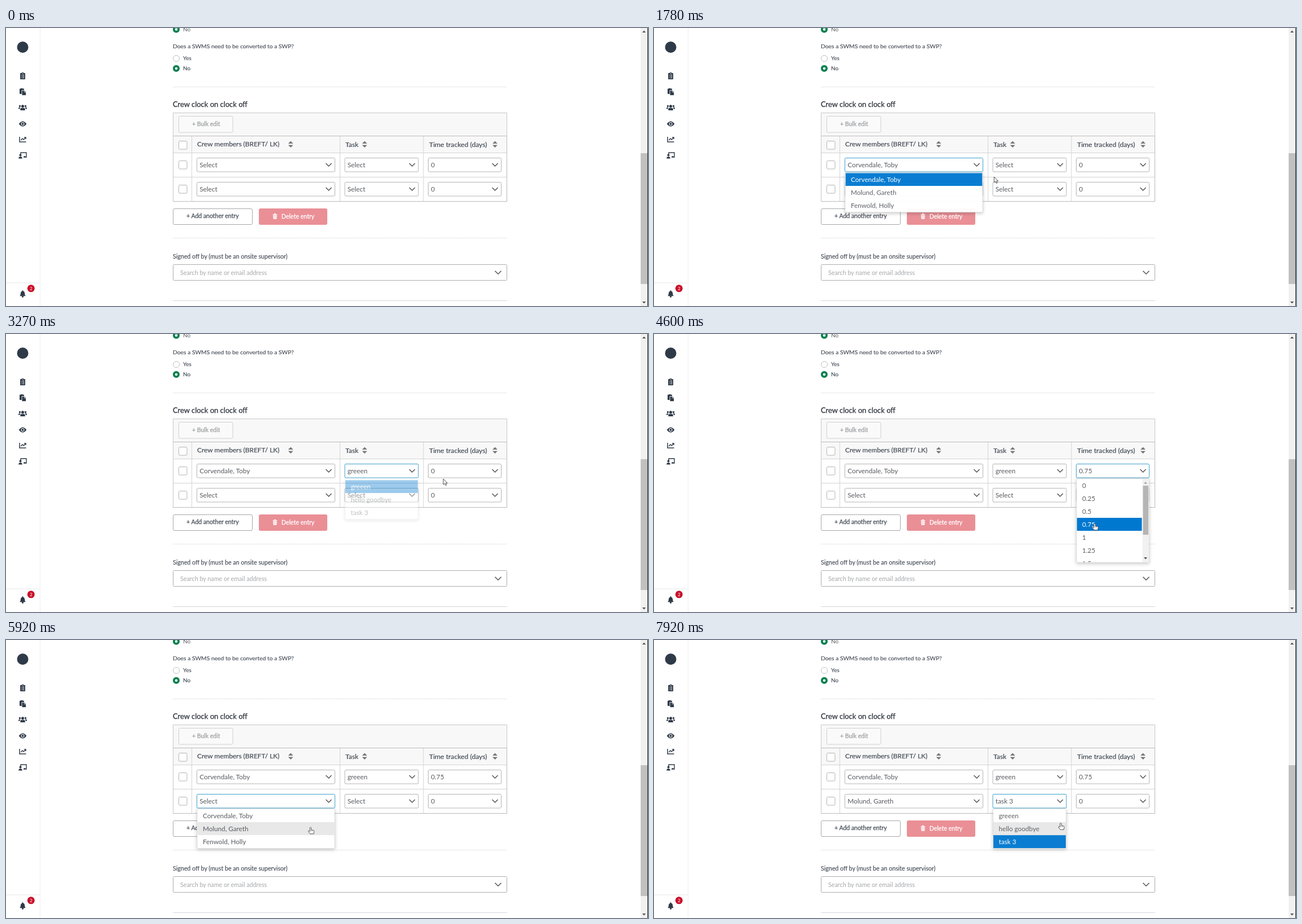
An HTML page for the animation above (7.99 s loop, 1135 by 493 pixels).

```html
<!DOCTYPE html>
<html lang="en">
<head>
<meta charset="utf-8">
<title>Crew clock on clock off</title>
<style>
  html, body { margin: 0; width: 100%; height: 100%; overflow: hidden; background: #fff; }
  svg { display: block; font-family: Lato, "Open Sans", sans-serif; }
  .menu { filter: drop-shadow(0 2px 3px rgba(0, 0, 0, .22)); }
</style>
</head>
<body>
<svg id="stage" width="1135" height="493" viewBox="0 0 1135 493">
  <g id="page"></g>
  <g id="fields"></g>
  <g id="menu"></g>
  <g id="pointer"></g>
</svg>
<script>
const LOOP = 7990;
const INK = '#434b55', TEXT = '#585b60', BLUE = '#0078d0', ICON = '#2f3a48';
const ROW = 23, OPEN_TIME = 280, CLOSE_DELAY = 150, CLOSE_TIME = 260;
const layer = id => document.getElementById(id);

// Shape helpers
const rect = (x, y, w, h, fill, stroke = 'none', r = 0, sw = 1) =>
  `<rect x="${x}" y="${y}" width="${w}" height="${h}" rx="${r}" fill="${fill}" stroke="${stroke}" stroke-width="${sw}"/>`;
const circle = (x, y, r, fill, stroke = 'none') =>
  `<circle cx="${x}" cy="${y}" r="${r}" fill="${fill}" stroke="${stroke}"/>`;
const path = (d, fill, stroke = 'none', sw = 1, extra = '') =>
  `<path d="${d}" fill="${fill}" stroke="${stroke}" stroke-width="${sw}" ${extra}/>`;
const at = (x, y, body) => `<g transform="translate(${x} ${y})">${body}</g>`;
const label = (str, x, cy, size, fill = TEXT, bold = 0) =>
  `<text x="${x}" y="${cy + size * 0.35}" font-size="${size}" fill="${fill}" stroke="${fill}" stroke-width="${bold}">${str}</text>`;
const chevron = (x, y, s = 1) =>
  path(`M${x - 5 * s} ${y - 2.5 * s}l${5 * s} ${5 * s} ${5 * s} ${-5 * s}`, 'none', '#555', 1.5);
const sorter = x => path(`M${x - 4.5} 205h9l-4.5 -4.5zM${x - 4.5} 207.5h9l-4.5 4.5z`, '#777');
const lerp = (a, b, k) => a + (b - a) * k;
const clamp = v => Math.max(0, Math.min(1, v));
const mix = (a, b, k) => `rgb(${a.map((v, i) => Math.round(lerp(v, b[i], k)))})`;

// Select boxes
const crew = ['Corvendale, Toby', 'Molund, Gareth', 'Fenwold, Holly'];
const tasks = ['greeen', 'hello goodbye', 'task 3'];
const days = ['0', '0.25', '0.5', '0.75', '1', '1.25', '1.5'];
const columns = [
  { x: 337.5, w: 244, options: crew, empty: 'Select' },
  { x: 599, w: 130, options: tasks, empty: 'Select' },
  { x: 746.5, w: 129, options: days, empty: '0', initial: 0, scrolls: true },
];
const fields = [230.5, 273.5].flatMap(y => columns.map(c => ({ ...c, y, h: 24.5 })));

// Each visit to a select: when it opens, when an option is picked, and which
const visits = [
  { field: 0, open: 970, pick: 1620, choice: 0 },
  { field: 1, open: 2250, pick: 2960, choice: 0 },
  { field: 2, open: 3450, pick: 4530, choice: 3 },
  { field: 3, open: 5290, pick: 6240, choice: 1 },
  { field: 4, open: 6700, pick: 7760, choice: 2 },
];

// Pointer tip: time, x, y
const route = [
  [430, 650, 292], [810, 545, 243], [1200, 545, 243], [1460, 540, 266], [1620, 540, 266],
  [1780, 601, 264], [2020, 652, 243], [2450, 652, 243], [2800, 655, 268], [2960, 655, 268],
  [3270, 773, 257], [3420, 787, 246], [3820, 787, 246], [4290, 779.5, 336], [4600, 779.5, 336],
  [5140, 545, 286], [5760, 545, 286], [5920, 538.5, 332], [6240, 538.5, 332],
  [6560, 645.5, 283], [7200, 645.5, 283], [7440, 700, 356], [7760, 700, 356],
  [7920, 719, 324.5], [7990, 722, 319],
];

function pointerAt(t) {
  if (t < route[0][0]) return null;
  const i = route.findIndex(p => p[0] > t);
  const [a, b] = [route[i - 1], route[i]];
  const k = (t - a[0]) / (b[0] - a[0]);
  return { x: lerp(a[1], b[1], k), y: lerp(a[2], b[2], k) };
}

const inside = (p, b) => p && p.x >= b.x && p.x <= b.x + b.w && p.y >= b.y && p.y <= b.y + b.h;

function chosen(index, t) {
  const visit = visits.find(v => v.field === index);
  return visit && t >= visit.pick ? visit.choice : fields[index].initial;
}

function menuAt(t) {
  const visit = visits.find(v => t >= v.open && t < v.pick + CLOSE_DELAY + CLOSE_TIME);
  if (!visit) return null;
  const f = fields[visit.field];
  const alpha = Math.min(clamp((t - visit.open) / OPEN_TIME),
    1 - clamp((t - visit.pick - CLOSE_DELAY) / CLOSE_TIME));
  return {
    ...f, alpha, index: visit.field, x: f.x + 1, w: f.w - 2, y: f.y + 26.5,
    h: f.scrolls ? 147.5 : f.options.length * ROW,
  };
}

function drawMenu(m, tip, t) {
  const selected = chosen(m.index, t);
  const rowWidth = m.scrolls ? 115 : m.w;
  const hover = inside(tip, m) ? Math.floor((tip.y - m.y) / ROW) : -1;
  const rows = m.options.map((name, i) => {
    const y = m.y + i * ROW;
    const fill = i === selected ? BLUE : i === hover ? '#e8e8e8' : '#fff';
    const h = Math.min(ROW, m.y + m.h - y);
    return rect(m.x, y, rowWidth, h, fill) +
      label(name, m.x + 9.5, y + 11.5, 11.7, i === selected ? '#fff' : TEXT);
  }).join('');
  const bar = m.scrolls
    ? rect(863.5, m.y, 11, m.h, '#f1f1f1') + rect(864.5, 269, 9.5, 87, '#b5b5b5') +
      path('M866 265.5h6l-3 -3.5z', '#a3a3a3') + path('M866 396h6l-3 3.5z', '#505050')
    : '';
  return `<g class="menu" opacity="${m.alpha}" transform="translate(0 ${3.5 * (1 - m.alpha)})">` +
    rect(m.x - .5, m.y - .5, m.w + 1, m.h + 1, '#fff', '#ddd') +
    `<clipPath id="list"><rect x="${m.x}" y="${m.y}" width="${m.w}" height="${m.h}"/></clipPath>` +
    `<g clip-path="url(#list)">${rows}${bar}</g></g>`;
}

function drawField(f, index, tip, covered, t) {
  const rest = [180, 180, 180], dark = [70, 78, 88], focus = [60, 160, 203];
  const start = visits.findIndex(v => v.field === index);
  const next = start >= 0 && visits[start + 1] ? visits[start + 1].open : LOOP;
  const focused = start >= 0 && t >= visits[start].open && t < next;
  const border = focused ? mix(dark, focus, clamp((t - visits[start].open) / 300))
    : mix(rest, dark, !covered && inside(tip, f) ? 1 : 0);
  const choice = chosen(index, t);
  return rect(f.x, f.y, f.w, f.h, '#fff', border, 2) +
    label(choice === undefined ? f.empty : f.options[choice], f.x + 4.7, f.y + 12.3, 11.8) +
    chevron(f.x + f.w - 11, f.y + 12);
}

const arrow = path('M0 0V10.2L2.4 8.1 4.1 11.6 5.8 10.8 4.2 7.5H7.2Z', '#fff', '#3a3a3a', .9);
const hand = path('M-1.2 .9Q0 -.8 1.2 .9V4.6L5.3 5.7Q6.4 6.1 6.2 7.4L5.5 11.8H-.8L-4 7.6Q-4.2 6 -2.6 6.4L-1.2 7.6Z',
  '#fff', '#444', .9, 'stroke-linejoin="round"') + path('M1.2 5v2M3.2 5.3v2', 'none', '#666', .7);

// Static page
function sidebar() {
  const fill = ICON, cut = '#fff';
  const clipboard = rect(-4.5, -5, 9, 11, fill, 'none', 1) + rect(-2, -6.2, 4, 2.5, fill, 'none', 1) +
    path('M-.8 -1.7h3.7M-.8 .8h3.7M-.8 3.3h3.7M-2.9 -1.7h1M-2.9 .8h1M-2.9 3.3h1M-1 -4.6h2', 'none', cut, .9);
  const copies = rect(-5.5, -5.5, 8, 9.5, fill, 'none', 1) + rect(-3, -6.3, 3, 2, fill, 'none', 1) +
    path('M-1.5 -2.5h4.5l3 3v6h-7.5z', fill, cut, .8) + path('M2.8 -2.3v3h3', 'none', cut, .7);
  const people = circle(-5, -2.5, 1.7, fill) + circle(5, -2.5, 1.7, fill) + circle(0, -2.2, 2.5, fill) +
    path('M-4.2 5v-2q0 -2.2 2.4 -2.2h3.6q2.4 0 2.4 2.2v2zM-7.5 2.5v-1.3q0 -1.5 1.5 -1.5h2.3q-1.3 1 -1.5 2.8zM7.5 2.5v-1.3q0 -1.5 -1.5 -1.5h-2.3q1.3 1 1.5 2.8z', fill);
  const eye = path('M-6.8 0Q0 -9 6.8 0Q0 9 -6.8 0Z', fill) + circle(0, 0, 3, cut) + circle(0, 0, 2, fill);
  const chart = path('M-5.5 -4.5v9h11.5', 'none', fill, 1.5) +
    path('M-3.3 1.5l2.8 -3 2.2 2 3.5 -3.8M2.5 -3.6h3v3', 'none', fill, 1.4);
  const teacher = path('M-3.5 -2v-3h10v8h-5', 'none', fill, 1.4) + circle(-4, -.5, 2, fill) +
    path('M-7.3 5.5q0 -3.5 3.3 -3.5t3.3 3.5z', fill) + rect(2, 1.2, 3, 1.8, fill);
  const bell = path('M-5.2 3.8Q-3.6 2.4 -3.6 -1Q-3.4 -4.5 0 -5.2Q3.4 -4.5 3.6 -1Q3.6 2.4 5.2 3.8Z', fill) +
    circle(0, 4.8, 1.6, fill) + rect(-.7, -6.3, 1.4, 2, fill);
  const icons = [[85, clipboard], [113, copies], [141, people], [170, eye], [197.5, chart], [226, teacher], [471.5, bell]];
  return rect(59.5, 0, 1, 493, '#f0f0f0') + rect(60.5, 0, 1.5, 493, '#fafafa') +
    rect(0, 451.5, 59, 1, '#e8e8e8') + circle(29.5, 34, 10, ICON) +
    icons.map(([y, body]) => at(29.5, y, body)).join('') +
    circle(44.2, 461.8, 6.5, '#c9102a') + label('2', 41.9, 461.8, 8, '#fff');
}

function radio(y, on) {
  return on ? circle(301, y, 6, '#007f4c') + circle(301, y, 2.3, '#fff') : circle(301, y, 5.5, '#fff', '#c0c0c0');
}

function table() {
  const line = '#d4d4d4';
  const rules = [191.5, 221.5, 264.5].map(y => `M295.5 ${y}H885.5`).join('') +
    [328.5, 590.5, 738].map(x => `M${x} 191.5V307.5`).join('');
  return rect(295.5, 150.5, 590, 157, '#fff') + rect(295.5, 150.5, 590, 71, '#f8f8f8') +
    path(rules, 'none', line) + rect(295.5, 150.5, 590, 157, 'none', '#c8c8c8') +
    path('M295.5 191.5H885.5V307.5H295.5', 'none', '#bbb') +
    rect(305.5, 156.5, 95.5, 28.5, '#fafafa', '#d0d0d0', 2) + label('+ Bulk edit', 329, 170.3, 10.5, '#96989b', .2) +
    [208, 243, 286].map(y => rect(305.5, y - 7.5, 14.5, 14.5, '#fff', '#b4b4b4', 2)).join('') +
    label('Crew members (BREFT/ LK)', 338, 206.3, 11.9, INK, .2) + sorter(503.3) +
    label('Task', 600, 206.3, 12, INK, .2) + sorter(634) +
    label('Time tracked (days)', 748, 206.3, 12.2, INK, .2) + sorter(864.5);
}

function buttons() {
  const bin = path('M-4 -3.2h8M-1.4 -4.5h2.8', 'none', '#fff', 1.3) + path('M-3.4 -1.8h6.8l-.5 6.6h-5.8z', '#fff') +
    path('M-1.3 -.6v4M1.3 -.6v4', 'none', '#ea8f96', .7);
  return rect(295.5, 320.5, 140, 28, '#fff', '#a6a7a9', 2.5) + label('+ Add another entry', 319, 333.8, 10.5, INK, .25) +
    rect(447, 320, 121, 29, '#ea8f96', 'none', 3) + at(475.5, 334, bin) +
    label('Delete entry', 487, 333.8, 10.6, '#fff', .3);
}

function page() {
  const dotted = y => path(`M295 ${y}H886`, 'none', '#dcdcdc', 1, 'stroke-dasharray="2 1"');
  return rect(0, 0, 1135, 493, '#fff') + sidebar() +
    radio(2.5, true) + label('No', 313, 2.8, 10) +
    label('Does a SWMS need to be converted to a SWP?', 295, 32.3, 10.3, INK, .15) +
    radio(54, false) + label('Yes', 313, 53.8, 10, INK, .15) + radio(71.8, true) + label('No', 313, 71.6, 10, INK, .15) +
    dotted(104.5) + label('Crew clock on clock off', 295, 135.3, 12.95, '#2a3038', .25) +
    table() + buttons() + dotted(372.5) +
    label('Signed off by (must be an onsite supervisor)', 295, 405.3, 10.65, INK, .15) +
    rect(295.5, 419.5, 590, 28, '#fff', '#adadad', 2) +
    label('Search by name or email address', 308, 434, 10.75, '#a5a7aa') + chevron(870, 433.5, 1.1) +
    rect(295, 483, 591, 1, '#d6d6d6') +
    rect(1122, 0, 12, 493, '#f1f1f1') + rect(1122, 222, 12, 232, '#c1c1c1') +
    path('M1125 8h6l-3 -3.5zM1125 485h6l-3 3.5z', '#505050') + rect(1134, 0, 1, 493, '#222');
}

function render(t) {
  const tip = pointerAt(t);
  const menu = menuAt(t);
  const covered = menu && inside(tip, menu);
  layer('fields').innerHTML = fields.map((f, i) => drawField(f, i, tip, covered, t)).join('');
  layer('menu').innerHTML = menu ? drawMenu(menu, tip, t) : '';
  const clickable = covered || fields.some(f => inside(tip, f));
  layer('pointer').innerHTML = tip ? at(tip.x, tip.y, clickable ? hand : arrow) : '';
}

layer('page').innerHTML = page();
const began = performance.now();
function tick() {
  render((performance.now() - began) % LOOP);
  requestAnimationFrame(tick);
}
tick();
</script>
</body>
</html>
```
